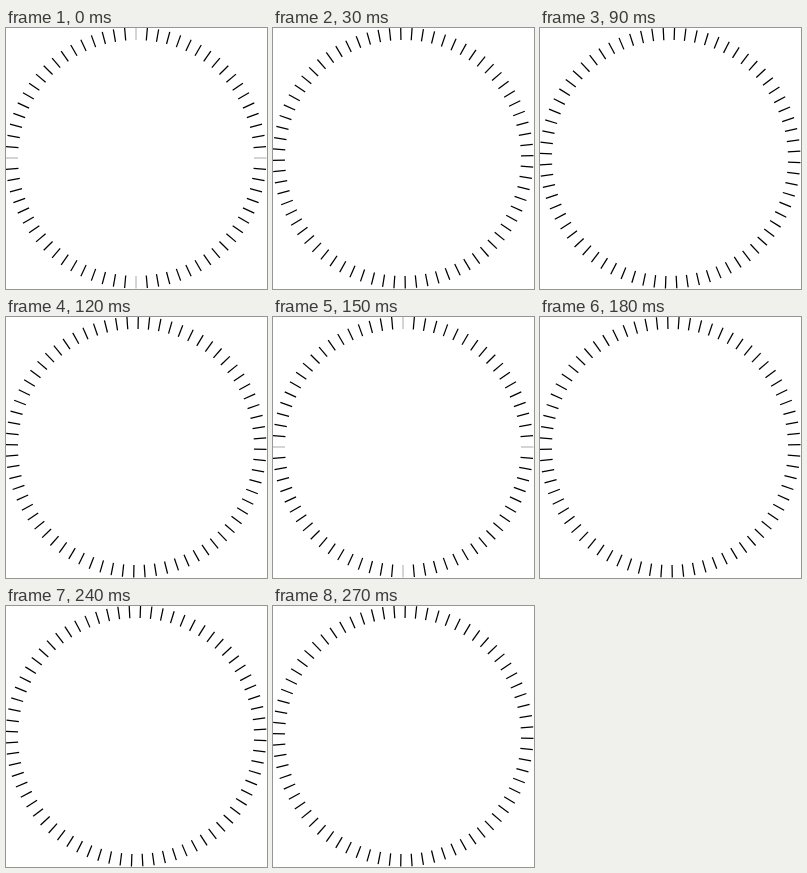
Recreate the animation shown at these times as an HTML page with a canvas. Size 261 by 261 pixels, loop 300 ms.

```html
<!DOCTYPE html>
<html lang="en">
<head>
<meta charset="utf-8">
<title>Rotating tick ring</title>
<style>
  html, body { margin: 0; width: 100%; height: 100%; overflow: hidden; background: #fff; }
  canvas { display: block; }
</style>
</head>
<body>
<canvas id="stage" width="261" height="261"></canvas>
<script>
const ctx = document.getElementById("stage").getContext("2d");
const SIZE = 261, CENTER = 130, INNER = 118, OUTER = 130.5;
const TICKS = 72, STEP_MS = 30, STEPS = 10;
const RAD = Math.PI / 180;

function drawTick(degrees) {
  const dx = Math.sin(degrees * RAD), dy = -Math.cos(degrees * RAD);
  // Ticks on the axes fall between two pixel rows and look pale.
  const onAxis = degrees % 90 === 0;
  ctx.strokeStyle = onAxis ? "#aaa" : "#000";
  ctx.lineWidth = onAxis ? 1 : 1.25;
  ctx.beginPath();
  ctx.moveTo(CENTER + dx * INNER, CENTER + dy * INNER);
  ctx.lineTo(CENTER + dx * OUTER, CENTER + dy * OUTER);
  ctx.stroke();
}

function render(now) {
  // The ring turns back one degree per step.
  const step = Math.floor(now / STEP_MS) % STEPS;
  ctx.fillStyle = "#fff";
  ctx.fillRect(0, 0, SIZE, SIZE);
  for (let i = 0; i < TICKS; i++) drawTick(i * 360 / TICKS - step);
}

const start = performance.now();
function loop() {
  render(performance.now() - start);
  requestAnimationFrame(loop);
}
loop();
</script>
</body>
</html>
```
